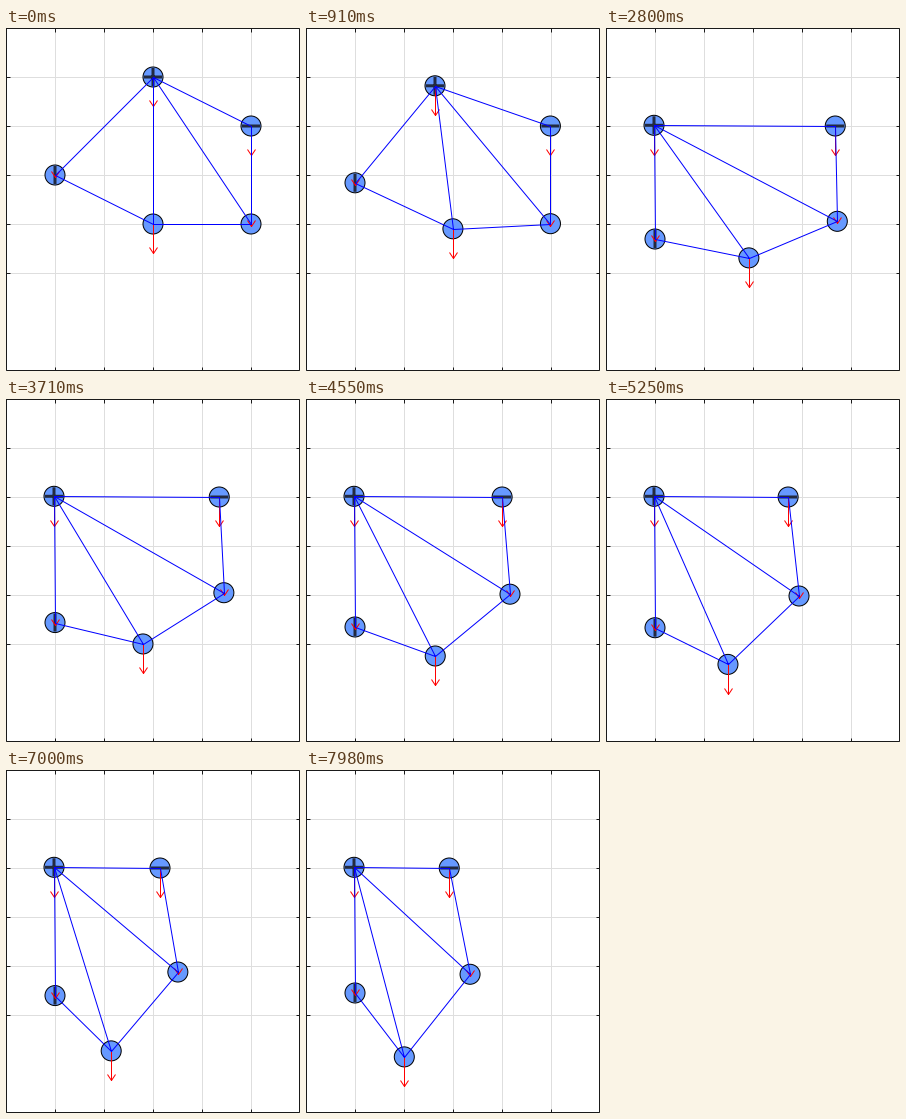
A matplotlib script that plays this animation: 294 by 343 pixels, repeating every 8 s.

```python
import numpy as np
import matplotlib.pyplot as plt
from matplotlib.animation import FuncAnimation
from matplotlib.patches import Circle

W, H, DPI = 294, 343, 49
PX = 72 / DPI            # points per pixel
TICK, STEP = 20, 70      # ms per drawn frame, ms per pose
FRAMES = 8000 // TICK
CELL = 49
INK, GRID = "#1a1a1a", "#dedede"
NODE, MARK = "#6699ff", "#222a40"

# Truss nodes: A top, B upper right, C left, D bottom, E lower right
BARS = ["AC", "AD", "AE", "AB", "CD", "DE", "BE"]
HEAVY, LIGHT = 0.6 * CELL, 0.04 * CELL
LOADS = {"A": HEAVY, "B": HEAVY, "C": LIGHT, "D": HEAVY, "E": LIGHT}
RAILS = {"A": "hv", "B": "h", "C": "v"}


def creep(k, reach, half, power):
    """Slow start, then settling towards reach; half of it is done at step half."""
    return reach * k**power / (k**power + half**power)


def pose(k):
    slide = min(1, 0.00866 * k + 0.00041 * k * k)
    left, mid, far = CELL, 3 * CELL, 5 * CELL
    return {
        "A": (mid - 99 * slide, CELL + 48.3 * slide),
        "B": (far - creep(k, 135, 78.5, 3), 2 * CELL),
        "C": (left, mid + creep(k, 97, 31, 2.8) - creep(k, 32, 104, 3.5)),
        "D": (mid - creep(k, 68, 87.5, 3.5), 4 * CELL + creep(k, 119, 63.4, 2)),
        "E": (far - creep(k, 104, 75, 3),
              4 * CELL - creep(k, 5, 32, 3) + creep(k, 19, 93, 4)),
    }


def join(parts):
    """Stack polylines into one x, y pair with gaps between them."""
    gap = [(np.nan, np.nan)]
    return np.array([p for part in parts for p in list(part) + gap]).T


def arrow(x, y, length):
    tip = y + length
    return [[(x, y), (x, tip)],
            [(x - 4, tip - 6), (x, tip), (x + 4, tip - 6)]]


def rail(x, y, kind):
    return [(x - 9, y), (x + 9, y)] if kind == "h" else [(x, y - 9), (x, y + 9)]


fig = plt.figure(figsize=(W / DPI, H / DPI), dpi=DPI, facecolor="white")
ax = fig.add_axes([0, 0, 1, 1])
ax.set_xlim(0, W)
ax.set_ylim(H, 0)
ax.axis("off")


def stroke(color, width, z, xy=((), ()), snap=True):
    return ax.plot(*xy, color=color, lw=width * PX, zorder=z, snap=snap,
                   solid_capstyle="butt", solid_joinstyle="miter")[0]


right, bottom = W - 1, H - 1
grid, ticks = [], []
for g in range(CELL, right, CELL):
    grid += [[(g, 0), (g, bottom)], [(0, g), (right, g)]]
    ticks += [[(g, 0), (g, 4)], [(g, bottom - 3), (g, bottom)],
              [(0, g), (4, g)], [(right - 3, g), (right, g)]]
frame = [[(0, 0), (right, 0), (right, bottom), (0, bottom), (0, 0)]]
stroke(GRID, 1, 1, join(grid))
stroke(INK, 1, 2, join(ticks + frame))

discs = {n: ax.add_patch(Circle((0, 0), 10, fc=NODE, ec="black", lw=PX, zorder=3))
         for n in LOADS}
rails = stroke(MARK, 3, 4, snap=False)
arrows = stroke("red", 1, 5)
bars = stroke("blue", 1, 6)


def draw(i):
    p = pose((i * TICK + TICK // 2) // STEP)
    for n, disc in discs.items():
        disc.center = p[n]
    rails.set_data(*join(rail(*p[n], kind) for n, kinds in RAILS.items() for kind in kinds))
    arrows.set_data(*join(part for n, size in LOADS.items() for part in arrow(*p[n], size)))
    bars.set_data(*join([p[a], p[b]] for a, b in BARS))
    return [*discs.values(), rails, arrows, bars]


anim = FuncAnimation(fig, draw, frames=FRAMES, init_func=lambda: draw(0),
                     interval=TICK, repeat=True, repeat_delay=0)
plt.show()
```
